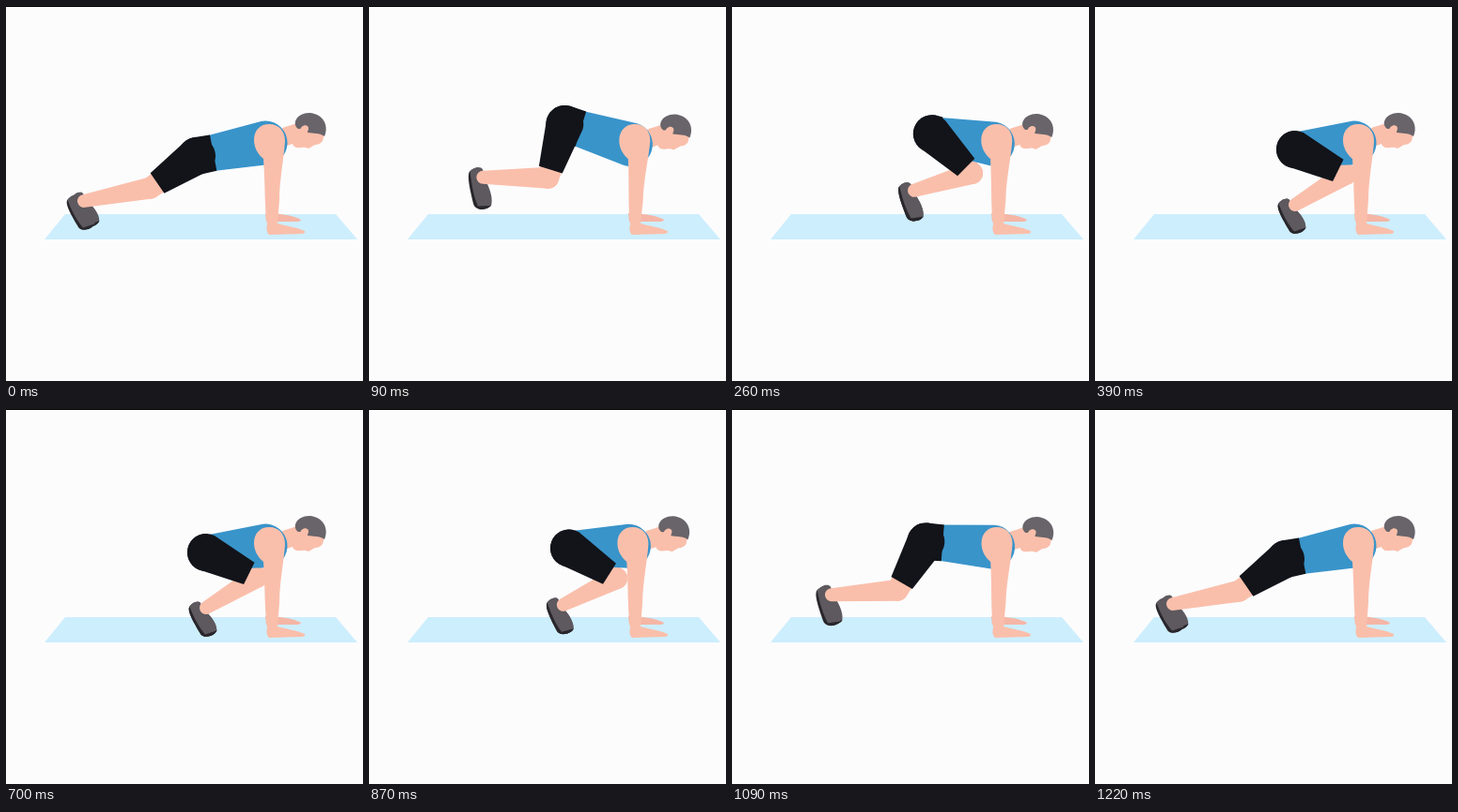
These frames come from a looping animation (380 px wide and 400 px high, 1.47 s). An HTML page with a canvas:

```html
<!DOCTYPE html>
<html lang="en">
<head>
<meta charset="utf-8">
<title>Squat thrust</title>
<style>
html, body { margin: 0; width: 100%; height: 100%; overflow: hidden; background: #fcfcfd; }
canvas { display: block; }
</style>
</head>
<body>
<canvas id="stage" width="380" height="400"></canvas>
<script>
const ctx = document.getElementById('stage').getContext('2d');
const SKIN = '#fabfab', FAR_SKIN = '#f5b6a6', BLUE = '#3994ca', BLACK = '#12141a',
      HAIR = '#68646a', SHOE = '#5d595f', SOLE = '#29272c', MAT = '#cdeefd';
const THIGH = 60;

const along = (p, angle, dist) => ({ x: p.x + dist * Math.cos(angle), y: p.y + dist * Math.sin(angle) });
const heading = (p, q) => Math.atan2(q.y - p.y, q.x - p.x);

function fill(color, path) {
  ctx.fillStyle = color;
  ctx.fill(new Path2D(path));
}

// Limb from p to q, round at p and round or cut straight at q
function limb(color, p, q, rp, rq, round) {
  const a = heading(p, q), side = Math.PI / 2;
  ctx.beginPath();
  ctx.arc(p.x, p.y, rp, a + side, a + 3 * side);
  if (round) {
    ctx.arc(q.x, q.y, rq, a - side, a + side);
  } else {
    for (const turn of [-side, side]) {
      const end = along(q, a + turn, rq);
      ctx.lineTo(end.x, end.y);
    }
  }
  ctx.fillStyle = color;
  ctx.fill();
}

// Knee in front of the line from hip to ankle, by the law of cosines
function kneeOf(hip, ankle, shin) {
  const d = Math.hypot(ankle.x - hip.x, ankle.y - hip.y);
  const cos = (THIGH ** 2 + d ** 2 - shin ** 2) / (2 * THIGH * d);
  return along(hip, heading(hip, ankle) - Math.acos(Math.min(1, cos)), THIGH);
}

function shoe(x, y, lift) {
  ctx.save();
  ctx.translate(x, y);
  ctx.rotate((20 * lift - 22) * Math.PI / 180);
  ctx.scale(1.1, .86 + .14 * lift);
  fill(SHOE, 'M-8,-19 C-5,-24 3,-24 4,-20 L6,-7 C9,2 11,12 9,19 C7,24 -2,24 -5,20 L-8,2Z');
  fill(SOLE, 'M-7,-20 C-11,-17 -9,0 -7,17 C-5,24 5,25 9,20 L-3,19 C-6,8 -7,-4 -7,-20Z');
  ctx.restore();
}

function head(dx, dy) {
  ctx.save();
  ctx.translate(dx, dy);
  fill(SKIN, 'M294,130 L310,125 L330,124 L339,136 L337,144 Q334,148 329,148 L322,152 Q318,150 314,151 Q306,152 305,147 L296,150Z');
  fill(HAIR, 'M311,131 C304,126 309,114 323,114 C338,115 344,128 339,139 C333,135 327,136 321,135 L320,129 L314,131Z');
  fill(SKIN, 'M313,133 C313,127 321,125 322,130 C322,135 317,139 314,136Z');
  ctx.restore();
}

// Hands stay planted; the arm leans with the shoulder.
function arm(lean) {
  ctx.save();
  ctx.transform(1, 0, -lean / 95, 1, lean * 235 / 95, 0);
  fill(SKIN, 'M264,143 C264,132 271,126 280,126 C291,126 297,134 297,144 C296,162 291,185 291,207 L289,232 C299,235 310,236 318,240 Q319,243 314,243 L280,244 Q276,240 278,233 C275,215 276,190 274,163 C268,158 264,151 264,143Z');
  ctx.restore();
}

// u runs from plank (0) to tuck (1); hipHop and footHop are jump heights.
function draw(u, hipHop, footHop) {
  const lift = Math.sin(Math.PI * u);
  const hip = { x: 203 + 10 * u + 3 * lift, y: 160 - 7 * u - hipHop * lift };
  const ankle = { x: 83 + 130 * u, y: 208 + 4 * u - footHop * lift };
  const chest = { x: 276 + 3 * lift, y: 146 + 2 * lift };
  const knee = kneeOf(hip, ankle, 72 - 9 * u);
  const hem = along(hip, heading(hip, knee), THIGH * .85);
  const waist = along(hip, heading(hip, chest), 18 * (1 - u ** 4));
  const gap = 5 * (1 - u) ** 4;

  fill('#fcfcfd', 'M0,0H380V400H0Z');
  fill(MAT, 'M63,222 L351,222 L374,249 L41,249Z');
  fill(FAR_SKIN, 'M276,221 C290,221 305,223 314,228 Q314,230 308,230 L277,230Z');

  shoe(ankle.x - 4 + gap, ankle.y + 12 - gap * .6, lift);
  shoe(ankle.x - 4, ankle.y + 12, lift);
  limb(SKIN, knee, ankle, 11.5, 7, true);
  limb(SKIN, hip, knee, 14, 11.5, true);
  head(3 * lift, 2 * lift);
  limb(BLUE, hip, chest, 18, 23.5, true);
  limb(BLACK, hip, waist, 20, 19.5);
  limb(BLACK, hip, hem, 20, 13);
  arm(3 * lift);
  fill('#000', 'M0,0H380V1H0Z');
}

const LOOP = 1470, BACK = 830, STEPS = 9, STEP = 130 / 3;
const progress = ms => Math.min(STEPS, Math.floor((ms + 4) / STEP)) / STEPS;
const ease = (p, skew) => {
  const k = p ** skew;
  return k * k * (3 - 2 * k);
};

function tick(now) {
  const t = now % LOOP;
  if (t < BACK) draw(ease(progress(t), .68), 40, 33);
  else draw(ease(1 - progress(t - BACK), 1.2), 33, 20);
  requestAnimationFrame(tick);
}
tick(0);
</script>
</body>
</html>
```
